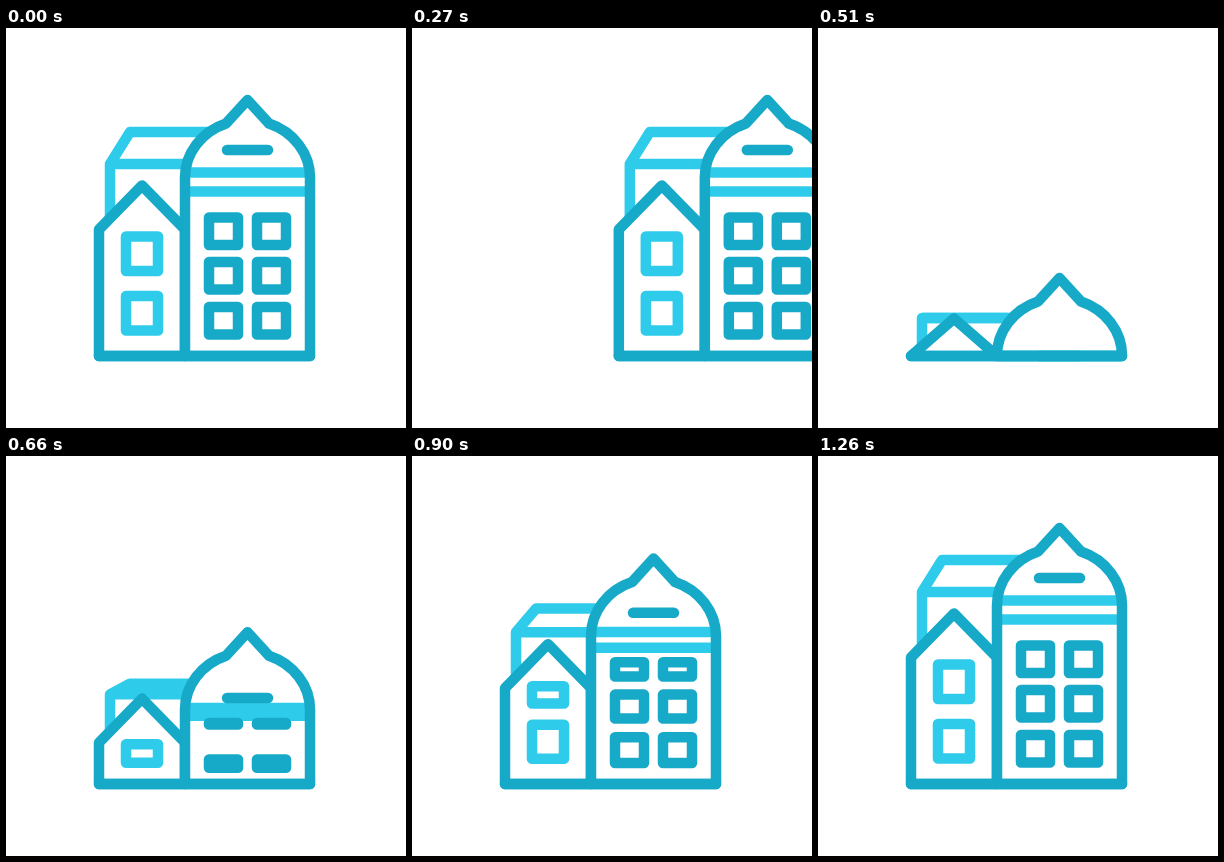
An HTML page with a canvas that plays this animation: 400x400 px, repeating every 1290 ms.

```html
<!DOCTYPE html>
<html>
<head>
<meta charset="utf-8">
<style>
html, body { margin: 0; height: 100%; overflow: hidden; background: #fff; }
canvas { display: block; }
</style>
</head>
<body>
<canvas width="400" height="400"></canvas>
<script>
const ctx = document.querySelector('canvas').getContext('2d');
const LOOP = 1290, STEP = 30, RISE_START = 400, RISE_END = 1260;
const DARK = '#17a9c8', LIGHT = '#2fcbeb', GROUND = 328;

// x, bottom, width, height, color, start of growth
const panes = [
  [120, 302.5, 32, 34.5, LIGHT, 540],
  [120, 243, 32, 34.5, LIGHT, 790]
];
for (const x of [203, 251]) {
  panes.push([x, 306.5, 29, 27.5, DARK, 600]);
  panes.push([x, 261.5, 29, 27.5, DARK, 650]);
  panes.push([x, 217, 29, 27.5, DARK, 785]);
}

function stroke(points, color, fill) {
  ctx.beginPath();
  for (const [x, y] of points) ctx.lineTo(x, y);
  if (fill) {
    ctx.closePath();
    ctx.fill();
  }
  ctx.strokeStyle = color;
  ctx.stroke();
}

function drawBuilding(t) {
  const left = Math.max(0, (RISE_END - t) / 750);
  const sink = (y, distance, power) => Math.min(GROUND, y + distance * left ** power);

  // Back block
  const ledge = sink(136, 154, 1.83);
  const top = ledge - 32 * Math.max(0, 1 - left ** 1.83);
  ctx.lineCap = 'butt';
  stroke([[104, GROUND], [104, ledge], [124, top], [204, top]], LIGHT);
  stroke([[104, ledge], [190, ledge]], LIGHT);

  // Small house
  const apex = sink(157.5, 133, 2);
  const eave = Math.min(GROUND, apex + 44);
  stroke([[93, GROUND], [93, eave], [136, apex], [179, eave], [179, GROUND]], DARK, true);

  // Domed tower
  const tip = sink(72, 178, 2.4);
  const k = Math.min(1, (GROUND - tip) / 77.5);
  const spring = tip + 77.5 * k, shoulder = spring - 54 * k;
  const bend = Math.acos(21.5 / 62.5);
  const tower = new Path2D();
  tower.moveTo(179, GROUND);
  tower.ellipse(241.5, spring, 62.5, 57.5 * k, 0, Math.PI, Math.PI + bend);
  tower.lineTo(241.5, tip);
  tower.lineTo(263, shoulder);
  tower.ellipse(241.5, spring, 62.5, 57.5 * k, 0, -bend, 0);
  tower.lineTo(304, GROUND);
  tower.closePath();
  ctx.fill(tower);
  for (const y of [sink(144.5, 183.5, 2.4), sink(163.5, 164.5, 2.4)])
    stroke([[179, y], [304, y]], LIGHT);
  ctx.strokeStyle = DARK;
  ctx.stroke(tower);

  ctx.lineCap = 'round';
  const dash = sink(122, 206, 2.42);
  stroke([[221, dash], [262, dash]], DARK);
  stroke([[93, GROUND], [304, GROUND]], DARK);

  for (const [x, bottom, w, h, color, start] of panes) {
    if (t <= start) continue;
    const u = Math.min(1, (t - start) / 450);
    const missing = h * (1 - u) ** 2.5;
    ctx.strokeStyle = color;
    ctx.strokeRect(x, bottom - h + missing * 1.27, w, h - missing);
  }
}

function frame(now) {
  const t = Math.floor(now % LOOP / STEP) * STEP;
  ctx.fillStyle = '#fff';
  ctx.fillRect(0, 0, 400, 400);
  ctx.lineWidth = 10.5;
  ctx.lineJoin = 'round';
  const slide = 31.6 * (t / 150) ** 2.18;
  if (slide < 320) {
    ctx.save();
    ctx.translate(slide, 0);
    drawBuilding(LOOP);
    ctx.restore();
  }
  if (t > RISE_START) drawBuilding(t);
  requestAnimationFrame(frame);
}
requestAnimationFrame(frame);
</script>
</body>
</html>
```
